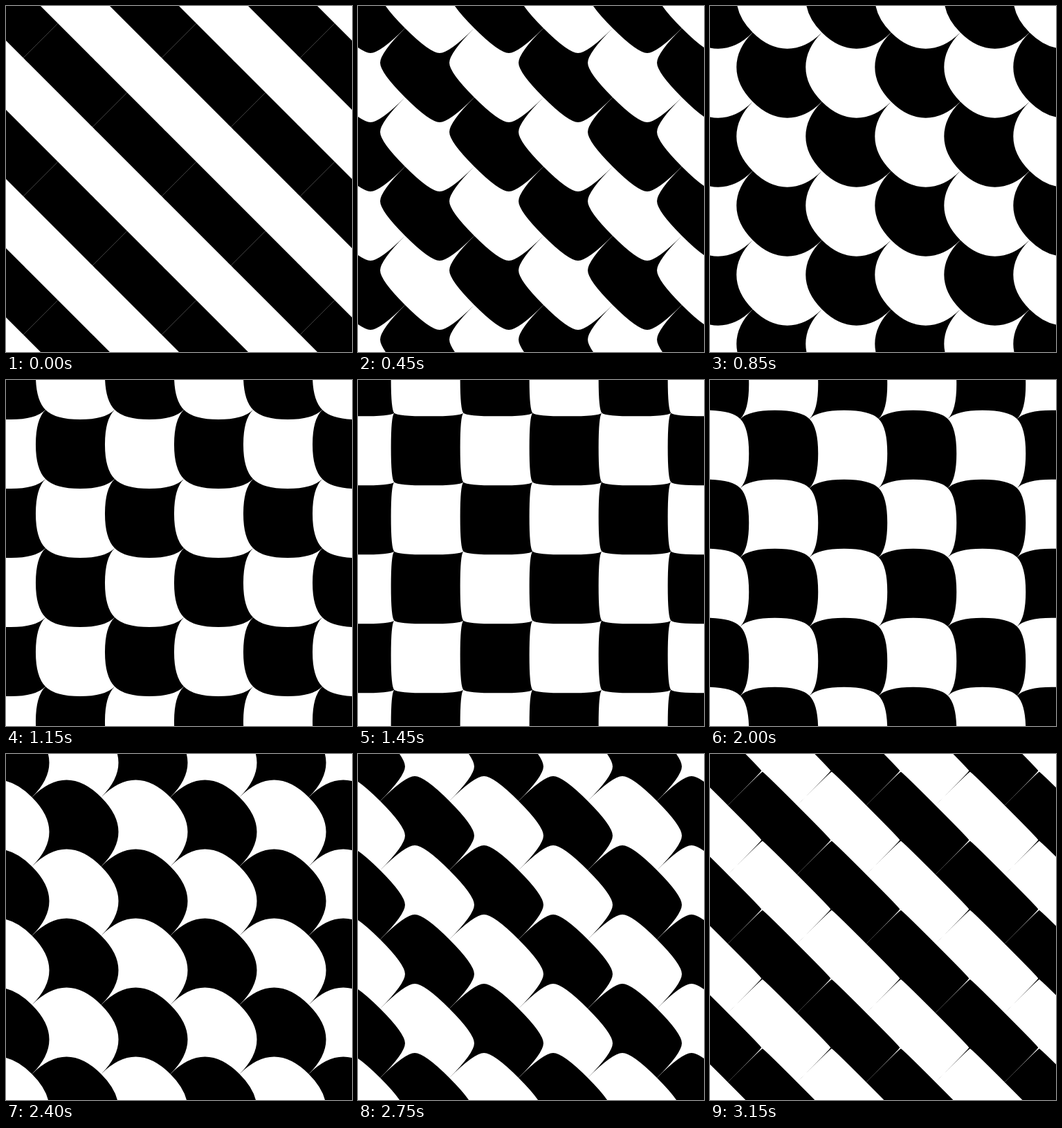
Recreate the animation shown at these times as an HTML page with a canvas. Size 500 by 500 pixels, loop 3200 ms.

```html
<!DOCTYPE html>
<html lang="en">
<head>
<meta charset="utf-8">
<title>Bending checkerboard</title>
<style>
  html, body { margin: 0; width: 100%; height: 100%; overflow: hidden; background: #fff; }
  canvas { display: block; width: 500px; height: 500px; }
</style>
</head>
<body>
<canvas id="stage" width="500" height="500"></canvas>
<script>
const ctx = document.getElementById("stage").getContext("2d");
const SIZE = 500, CELL = 100, HALF = CELL / 2;
const LOOP = 3200, STEP = 50;

// Curved side from (x, y) along unit (dx, dy), bulging by (bx, by).
// It leaves both corners at 45 degrees and is flat in the middle.
function side(x, y, dx, dy, bx, by) {
  const reach = Math.abs(bx + by);
  const at = d => [x + dx * d + bx, y + dy * d + by];
  ctx.quadraticCurveTo(...at(reach), ...at(HALF));
  ctx.quadraticCurveTo(...at(CELL - reach), x + dx * CELL, y + dy * CELL);
}

function tile(x, y, bulge) {
  ctx.beginPath();
  ctx.moveTo(x, y);
  side(x, y, 1, 0, 0, bulge);
  side(x + CELL, y, 0, 1, -bulge, 0);
  side(x + CELL, y + CELL, -1, 0, 0, bulge);
  side(x, y + CELL, 0, -1, -bulge, 0);
  ctx.closePath();
  ctx.fill();
}

function draw(time) {
  const shift = 25 - 50 * time / LOOP;
  ctx.fillStyle = "#fff";
  ctx.fillRect(0, 0, SIZE, SIZE);
  ctx.fillStyle = "#000";
  for (let row = -2; row <= 5; row++) {
    for (let col = -2; col <= 5; col++) {
      if ((row + col) % 2 === 0) {
        tile(HALF + col * CELL + shift, HALF + row * CELL - shift, 2 * shift);
      }
    }
  }
}

function tick() {
  const time = performance.now() % LOOP;
  draw(Math.floor(time / STEP) * STEP);
  requestAnimationFrame(tick);
}

draw(0);
requestAnimationFrame(tick);
</script>
</body>
</html>
```
